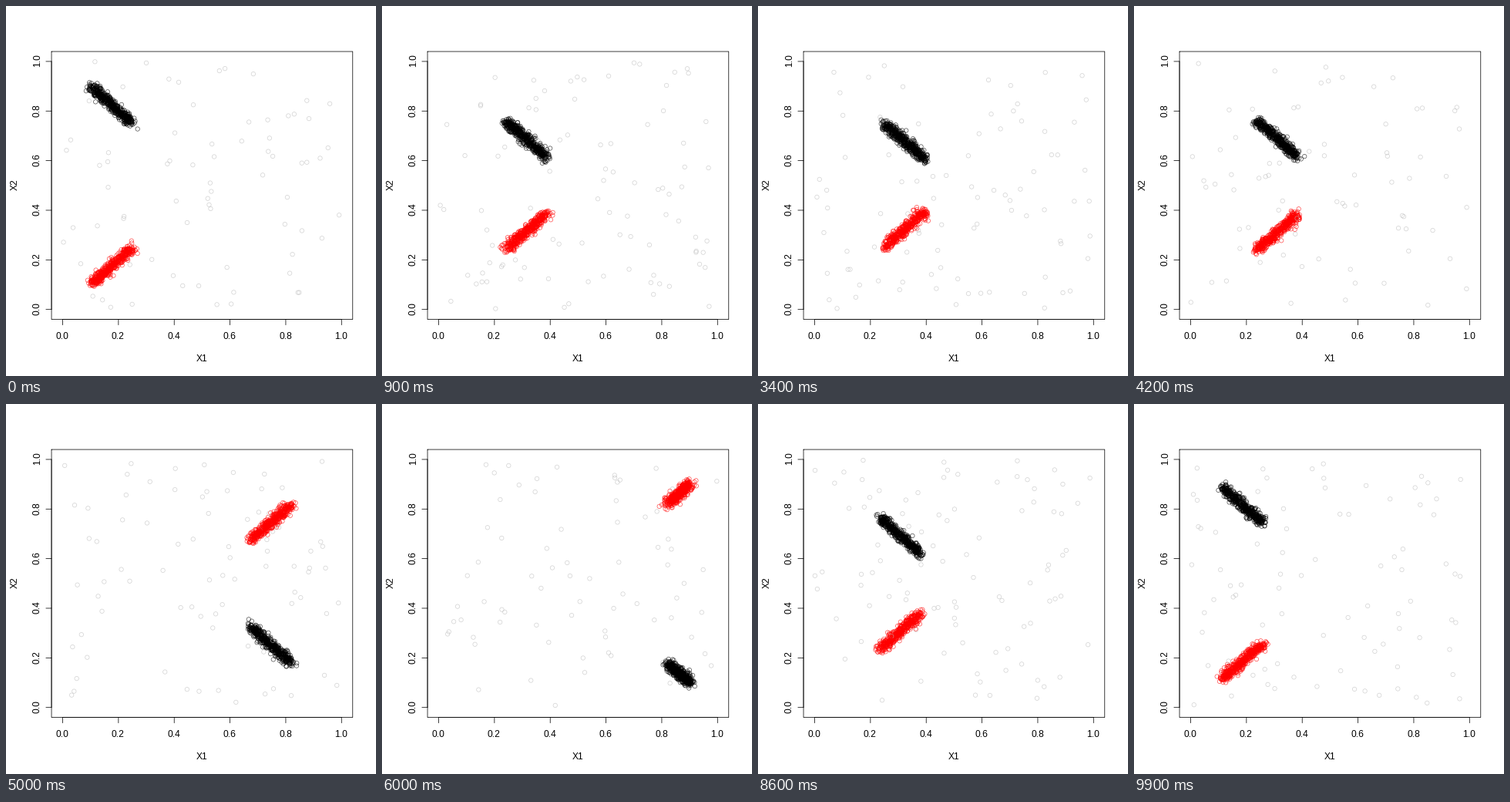
A matplotlib script for the animation above (10 s loop, 480x480 px).

```python
import numpy as np
import matplotlib.pyplot as plt
from matplotlib.animation import FuncAnimation
from matplotlib.lines import Line2D

SIZE, DPI = 480, 72
LINE = 14.4                     # one margin line in pixels
LEFT, RIGHT = 4.1 * LINE, SIZE - 2.1 * LINE
TOP, BOTTOM = 4.1 * LINE, SIZE - 5.1 * LINE
TICK = LINE / 2
FRAMES, INTERVAL = 100, 100

POINTS = 1000
NOISE = 0.085
SPREAD = 0.01
LO, SPAN = 0.1, 0.8             # the clusters travel back and forth on the diagonals
STEP, START = 0.14555, 0.003    # distance per frame, offset at time zero
ALPHA = 0.65
COLORS = np.array([(0, 0, 0, ALPHA), (1, 0, 0, ALPHA), (0.745, 0.745, 0.745, ALPHA)])

plt.rcParams["font.family"] = "Liberation Sans"
plt.rcParams["font.size"] = 12

fig = plt.figure(figsize=(SIZE / DPI, SIZE / DPI), dpi=DPI, facecolor="white")
ax = fig.add_axes([LEFT / SIZE, 1 - BOTTOM / SIZE,
                   (RIGHT - LEFT) / SIZE, (BOTTOM - TOP) / SIZE])
ax.set(xlim=(-0.04, 1.04), ylim=(-0.04, 1.04))
ax.axis("off")


def stroke(*points):
    x, y = np.array(points).T / SIZE
    fig.add_artist(Line2D(x, 1 - y, color="black", lw=0.75, snap=False,
                          solid_capstyle="round", solid_joinstyle="round"))


def label(x, y, text, rotation=0):
    fig.text(x / SIZE, 1 - y / SIZE, text, ha="center", va="baseline",
             rotation=rotation, rotation_mode="anchor")


def px(v):
    return LEFT + (RIGHT - LEFT) * (v + 0.04) / 1.08


def py(v):
    return BOTTOM - (BOTTOM - TOP) * (v + 0.04) / 1.08


stroke((LEFT, TOP), (RIGHT, TOP), (RIGHT, BOTTOM), (LEFT, BOTTOM), (LEFT, TOP))
stroke((px(0), BOTTOM), (px(1), BOTTOM))
stroke((LEFT, py(0)), (LEFT, py(1)))
for v in np.linspace(0, 1, 6):
    stroke((px(v), BOTTOM), (px(v), BOTTOM + TICK))
    stroke((LEFT, py(v)), (LEFT - TICK, py(v)))
    label(px(v) - 0.5, BOTTOM + 1.8 * LINE, f"{v:.1f}")
    label(LEFT - 1.06 * LINE, py(v) - 1, f"{v:.1f}", 90)
label((LEFT + RIGHT) / 2, BOTTOM + 3.8 * LINE, "X1")
label(LEFT - 3.06 * LINE, (TOP + BOTTOM) / 2 - 1, "X2", 90)

dots = ax.scatter([], [], s=5.4 ** 2, facecolors="none", linewidths=0.75)


def sample(k):
    """Stream one batch of points while both clusters keep moving."""
    rng = np.random.default_rng(1000 + k)
    kind = rng.choice(3, POINTS, p=[(1 - NOISE) / 2, (1 - NOISE) / 2, NOISE])
    phase = (START + STEP * (k + np.arange(POINTS) / POINTS)) % (2 * SPAN)
    pos = LO + SPAN - np.abs(SPAN - phase)
    xy = np.column_stack([pos, np.where(kind == 0, 1 - pos, pos)])
    xy += rng.normal(0, SPREAD, xy.shape)
    noise = kind == 2
    xy[noise] = rng.random((noise.sum(), 2))
    return xy, kind


def update(k):
    xy, kind = sample(k)
    dots.set_offsets(xy)
    dots.set_edgecolors(COLORS[kind])
    return dots,


anim = FuncAnimation(fig, update, frames=FRAMES, interval=INTERVAL,
                     repeat=True, repeat_delay=0)
plt.show()
```
